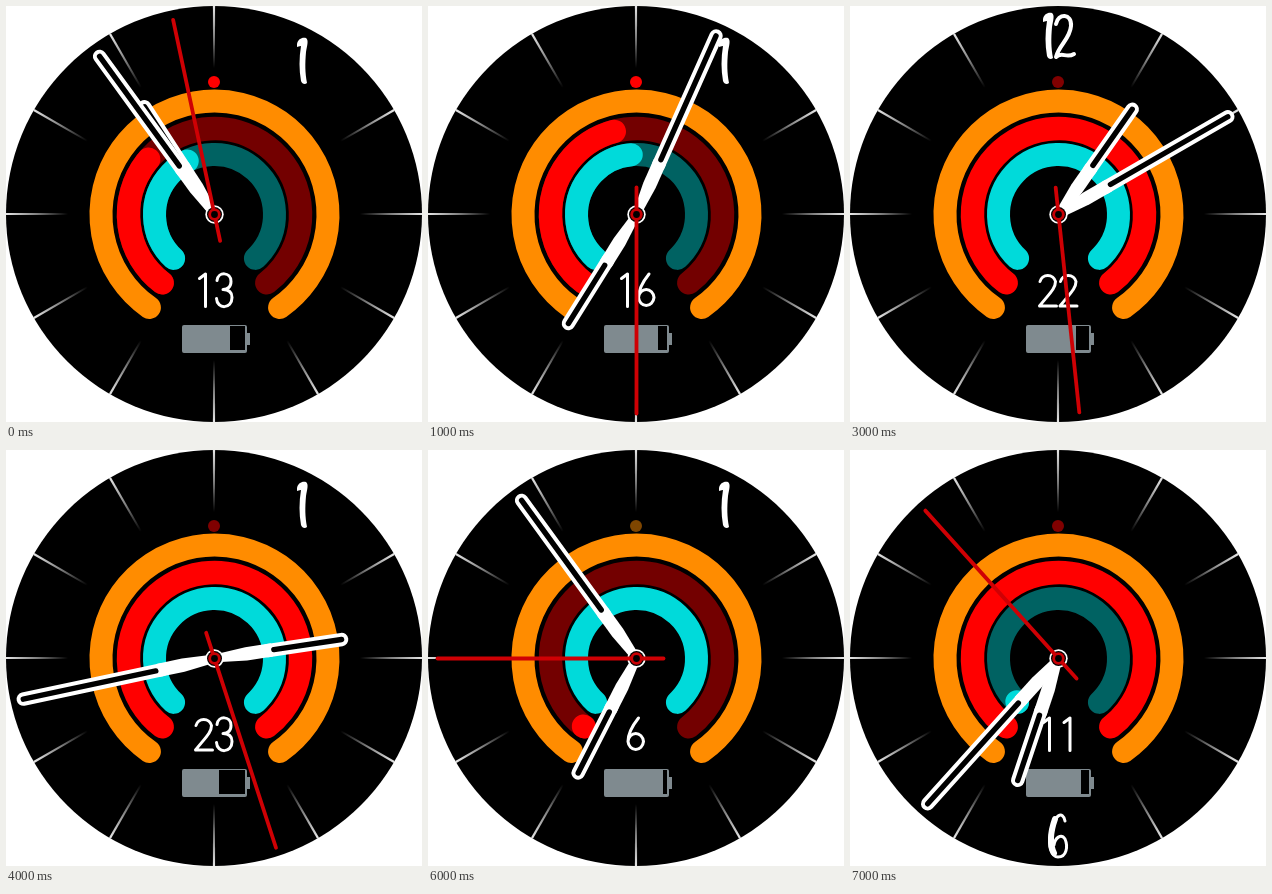
An HTML page with a canvas that plays this animation: 416x416 px, repeating every 8000 ms.

```html
<!DOCTYPE html>
<html lang="en">
<head>
<meta charset="utf-8">
<title>Watch face</title>
<style>
html, body { margin: 0; width: 100%; height: 100%; overflow: hidden; background: #fff; }
canvas { display: block; width: 100vmin; height: 100vmin; }
</style>
</head>
<body>
<canvas id="dial" width="416" height="416" role="img" aria-label="Watch face with date, battery and three progress rings"></canvas>
<script>
const ctx = document.getElementById('dial').getContext('2d');
const DIAL = 208;    // centre of the dial and its ticks
const HUB = 208.5;   // centre of the hands and rings
const STEP = 1000;
const rad = deg => (deg - 90) * Math.PI / 180;

const RED = '#ff0000', DIM_RED = '#800000', BROWN = '#7f4600';

// Rings: radius, width, gap angle either side of six o'clock, colours.
const RINGS = {
  orange: { r: 113.5, w: 23, gap: 35, on: '#ff8c00', off: '#733f00' },
  red: { r: 86, w: 23.5, gap: 37.5, on: RED, off: '#730000' },
  cyan: { r: 60, w: 23, gap: 43, on: '#00dada', off: '#006262' }
};

// Ring values are the angle at which the bright part ends; omitted means full.
const STATES = [
  { time: [10, 54, 58], date: '13', month: 1, dot: RED, empty: 224, red: 310, cyan: 333 },
  { time: [7, 4, 30], date: '16', month: 1, dot: RED, empty: 230, red: 345, cyan: 355 },
  { time: [10, 48, 14], date: '12', month: 1, dot: RED, empty: 236, red: 118, cyan: 16 },
  { time: [1, 10, 29], date: '22', month: 12, dot: DIM_RED, empty: 226 },
  { time: [2, 43, 27], date: '23', month: 1, dot: DIM_RED, empty: 213 },
  { time: [12, 15, 59], date: '21', month: 1, dot: BROWN, empty: 239, orange: 270, cyan: 110 },
  { time: [6, 54, 45], date: '6', month: 1, dot: BROWN, empty: 235, red: 218 },
  { time: [6, 37, 53], date: '11', month: 6, dot: DIM_RED, empty: 231, cyan: 224 }
];

const DIGITS = {
  1: 'M5 6 L11 1.5 V34',
  2: 'M1.5 9 A8 8 0 0 1 17 9 C17 16 11 21 1 33.5 H18',
  3: 'M2 8 C3 -1 16 -1 16 9 C16 15 12 17 8 17 C14 17 17 20 17 25 C17 37 2 37 1.5 26',
  6: 'M12 1.5 C6 9 1.5 17 1.5 25 A7.8 9 0 0 0 17 25 A7.8 9 0 0 0 1.5 25'
};

const SCRIPT_ONE = new Path2D('M291 38 C292 33 296 31 300 32 C303 34 301 40 300 46 ' +
  'C299 58 299 66 301 77 C299 79 296 78 295 75 C293 64 293 52 295 40 C293 40 292 41 291 41Z');
const SCRIPT_TWO = 'M206 18 C208 7 222 7 221 20 C220 33 209 39 206 51 C212 45 216 53 224 48';
const SCRIPT_SIX = 'M215 371 C213 360 204 365 201 381 C197 398 202 407 208 407 ' +
  'C217 407 218 396 215 389 C211 383 205 388 204 395';
const SIX_STEM = 'M205 369 C200 383 200 395 204 403';

function stroke(path, color, width) {
  ctx.strokeStyle = color;
  ctx.lineWidth = width;
  ctx.stroke(new Path2D(path));
}

function disc(x, y, r, color) {
  ctx.fillStyle = color;
  ctx.beginPath();
  ctx.arc(x, y, r, 0, Math.PI * 2);
  ctx.fill();
}

function turned(center, deg, draw) {
  ctx.save();
  ctx.translate(center, center);
  ctx.rotate(deg * Math.PI / 180);
  draw();
  ctx.restore();
}

function ticks(hidden) {
  const fade = ctx.createLinearGradient(0, -208, 0, -146);
  fade.addColorStop(0, 'rgba(255,255,255,.9)');
  fade.addColorStop(0.5, 'rgba(255,255,255,.5)');
  fade.addColorStop(1, 'rgba(255,255,255,0)');
  for (let hour = 1; hour <= 12; hour++) {
    if (hour === hidden) continue;
    turned(DIAL, hour * 30, () => {
      ctx.fillStyle = fade;
      ctx.fill(new Path2D('M-1.1 -208 H1.1 L.9 -146 H-.9Z'));
    });
  }
}

function monthNumeral(month) {
  ctx.fillStyle = '#fff';
  if (month === 1) ctx.fill(SCRIPT_ONE);
  if (month === 6) {
    stroke(SCRIPT_SIX, '#fff', 3);
    stroke(SIX_STEM, '#fff', 6);
  }
  if (month === 12) {
    ctx.save();
    ctx.translate(-98, -25);
    ctx.fill(SCRIPT_ONE);
    ctx.restore();
    stroke(SCRIPT_TWO, '#fff', 4);
  }
}

function arc(ring, end, color) {
  ctx.strokeStyle = color;
  ctx.lineWidth = ring.w;
  ctx.beginPath();
  ctx.arc(HUB, HUB, ring.r, rad(180 + ring.gap), rad(end));
  ctx.stroke();
}

function rings(state) {
  for (const [name, ring] of Object.entries(RINGS)) {
    const full = 180 - ring.gap;
    if (name in state) arc(ring, full, ring.off);
    arc(ring, state[name] ?? full, ring.on);
  }
}

function dateNumber(date) {
  const left = date.length > 1 ? 188.5 : 198.5;
  [...date].forEach((digit, i) => {
    ctx.save();
    ctx.translate(left + i * 20.5, 266.5);
    stroke(DIGITS[digit], '#fff', 3);
    ctx.restore();
  });
}

function battery(empty) {
  ctx.fillStyle = '#7f8a8f';
  ctx.beginPath();
  ctx.roundRect(176, 319, 65, 28, 2);
  ctx.rect(241, 327, 3, 12);
  ctx.fill();
  ctx.fillStyle = '#000';
  ctx.fillRect(empty, 320, 239 - empty, 24);
}

function hand(deg, length) {
  turned(HUB, deg, () => {
    const tip = 6.5 - length;
    ctx.fillStyle = '#fff';
    ctx.fill(new Path2D('M-4.5 -6 L-6.7 -32 V-58 H6.7 V-32 L4.5 -6Z'));
    stroke(`M0 -54 V${tip}`, '#fff', 13.4);
    stroke(`M0 -60 V${tip}`, '#000', 5.4);
  });
}

function secondHand(deg) {
  turned(HUB, deg, () => stroke('M0 -199 V27', '#cf0004', 3.8));
  disc(HUB, HUB, 6.2, '#c80004');
  disc(HUB, HUB, 3.4, '#000');
}

function drawFace(state) {
  const [h, m, s] = state.time;
  ctx.fillStyle = '#fff';
  ctx.fillRect(0, 0, 416, 416);
  ctx.lineCap = ctx.lineJoin = 'round';
  disc(DIAL, DIAL, 208, '#000');
  ticks(state.month);
  monthNumeral(state.month);
  disc(DIAL, 76, 6, state.dot);
  rings(state);
  dateNumber(state.date);
  battery(state.empty);
  hand(h * 30 + m / 2, 135);
  hand(m * 6, 202);
  disc(HUB, HUB, 9.2, '#fff');
  disc(HUB, HUB, 7.5, '#000');
  secondHand(s * 6);
}

function tick() {
  drawFace(STATES[Math.floor(performance.now() / STEP) % STATES.length]);
  requestAnimationFrame(tick);
}
tick();
</script>
</body>
</html>
```
